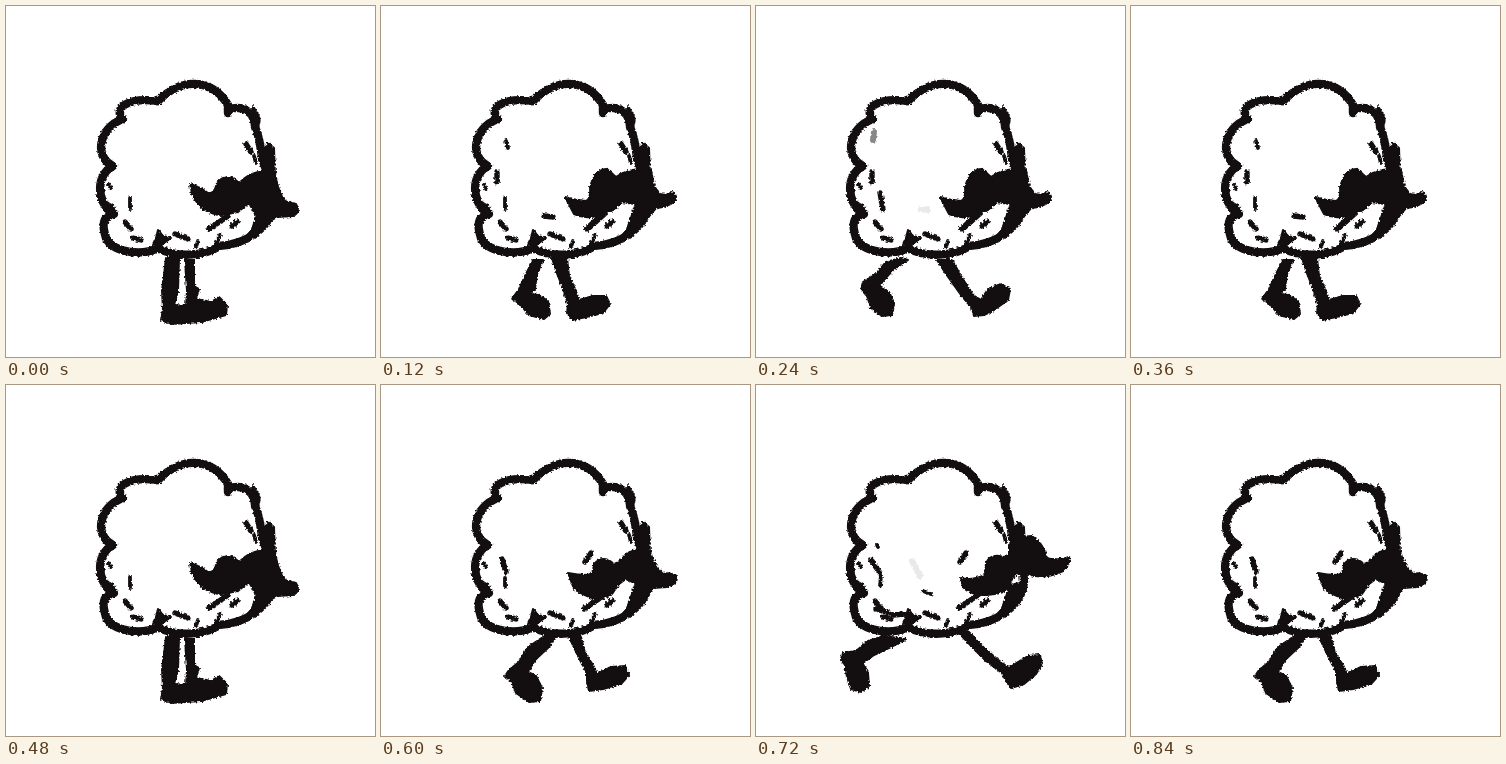
These frames come from a looping animation (369 by 351 pixels, 0.96 s). An HTML page without scripts:

```html
<!DOCTYPE html>
<html lang="en">
<head>
<meta charset="utf-8">
<title>Walking puff</title>
<style>
  html, body { margin: 0; width: 100%; height: 100%; overflow: hidden; background: #fff; }
  svg { display: block; width: 100%; height: 100%; }
  .ink { fill: #130e10; stroke: #130e10; stroke-width: 2; stroke-linejoin: round; stroke-linecap: round; }
  .line { fill: none; stroke-width: 8.4; }
  .thin { fill: none; stroke-width: 3.8; }
  .mark { fill: none; stroke-width: 5.4; }
  .soft { fill: none; stroke-width: 6; stroke: #888; }
  .faint { fill: none; stroke-width: 6; stroke: #e9e9e9; }
  /* eight poses, 120 ms each */
  .step { visibility: hidden; animation: show 960ms step-end infinite; animation-delay: calc(var(--i) * 120ms - 960ms); }
  @keyframes show {
    0% { visibility: visible; }
    12.5%, 100% { visibility: hidden; }
  }
</style>
</head>
<body>
<svg viewBox="0 0 369 351">
  <defs>
    <filter id="crayon" filterUnits="userSpaceOnUse" x="0" y="0" width="369" height="351" color-interpolation-filters="sRGB">
      <feTurbulence type="fractalNoise" baseFrequency=".5" numOctaves="2" seed="4" result="grain"/>
      <feDisplacementMap in="SourceGraphic" in2="grain" scale="3.6" xChannelSelector="R" yChannelSelector="G"/>
      <feGaussianBlur stdDeviation=".35"/>
    </filter>

    <g id="pass">
      <path d="M160 252L173 252 172 285 168 299 180 300 181 285 179 254 188 254 188 280 193 283 190 293 205 296 213 291 221 299 220 309 195 316 165 318 155 314 157 303 156 285Z"/>
      <path d="M184 178Q194 181 202 187Q208 189 211 177Q221 165 233 177Q244 166 258 165L269 166Q271 183 279 195L290 198Q295 206 287 210L271 211 260 217 249 208 243 197 232 206 216 209Q195 208 186 188Z"/>
      <path class="mark" d="M222 210L203 223"/>
      <path class="thin" d="M102 178l3 4M124 192v11M104 199l4 3"/>
    </g>

    <g id="near">
      <path d="M152 254L162 254 156 268 154 283 149 288 158 289 167 295 169 308 163 313 148 309 139 298 131 293 138 283 145 268Z"/>
      <path d="M171 252L186 252 188 270 195 285 198 294 212 290 225 290 229 298 222 307 205 311 192 314 186 307 187 298 181 280 175 265Z"/>
      <use href="#lowered"/>
      <path class="thin" d="M125 135l2 7M103 179l2 4M124 192v11M104 199l4 3"/>
      <path class="mark" d="M116 166l0 10M163 210l9 1"/>
    </g>

    <g id="wide">
      <path d="M152 254L137 264 127 275 123 281 133 286 138 297 136 309 126 310 115 302 111 290 105 283 107 276 120 268 130 256 145 252Z"/>
      <path d="M181 254L196 254 205 270 217 289 225 294 232 283 245 278 254 283 252 294 238 304 228 309 218 310 216 302 205 289 190 268Z"/>
      <use href="#lowered"/>
      <path class="soft" d="M118 126l-1 8"/>
      <path class="faint" d="M165 203l7 1"/>
      <path class="thin" d="M102 178l3 4M104 199l4 3"/>
      <path class="mark" d="M116 166v10M124 187l3 16"/>
    </g>

    <path id="lowered" d="M184 191Q193 194 205 195Q210 193 209 181Q214 163 226 163L235 171Q245 164 258 163L270 164 273 180 279 188Q288 190 290 186Q297 188 294 195Q287 201 275 202L264 215 258 199 241 196 232 204 214 210Q204 213 193 208Z M203 223L221 206 226 208 207 225Z"/>

    <g id="stride">
      <path d="M165 250L175 250 168 262 154 275 147 287 155 291 161 303 159 316 148 317 135 308 131 297 124 291 128 285 138 277 147 262Z"/>
      <path d="M188 252L200 252 204 268 212 280 216 289 230 282 244 281 248 290 240 299 222 304 208 306 206 297 206 288 199 275Z"/>
      <path d="M187 188Q196 190 207 190Q213 188 213 179Q222 169 233 179Q239 177 245 169L258 163 269 166Q273 181 282 189Q290 187 296 191Q297 199 286 202L272 203 263 213 258 200 245 194 238 199 231 209 217 215Q203 211 193 204Z"/>
      <path class="mark" d="M222 211L203 224M121 174l4 13M210 168l-6 9"/>
      <path class="thin" d="M102 178l3 4M124 193v9M104 199l4 3"/>
    </g>

    <g id="leap">
      <path d="M150 254L135 262 118 270 107 278 112 288 113 301 105 307 95 304 91 292 89 280 85 275 87 268 100 266 112 256 128 251Z"/>
      <path d="M202 247L213 247 225 260 241 274 253 283 262 277 272 271 284 270 286 279 280 289 268 299 255 303 250 296 246 288 230 276 218 264Z"/>
      <path d="M205 193Q215 196 229 190L230 178Q235 168 247 172L253 171 253 160Q263 151 276 151Q288 159 291 173Q303 176 313 172Q315 179 307 186Q293 193 278 191L264 186 257 192 252 203Q245 210 226 210Q213 209 207 202Z"/>
      <path class="mark" d="M222 210L203 223M210 168l-6 9M115 175l9 13M120 224l13 4M137 230l12 -1"/>
      <path class="thin" d="M102 178l3 4M121 160l1 2M125 190l-1 11M104 199l4 3M167 206l8 3"/>
      <path class="faint" d="M156 176l8 15"/>
    </g>
  </defs>

  <g class="ink" filter="url(#crayon)">
    <g class="line">
      <path d="M152 95C164 83 177 77 190 78C206 79 216 89 222 99V107"/>
      <path d="M222 104C236 98 249 106 249 121C253 130 255 142 256 152C261 168 268 182 268 197C266 220 241 239 212 240"/>
      <path d="M212 241C198 250 169 252 152 242C136 250 107 247 100 232C97 222 94 211 108 208"/>
      <path d="M106 207C90 194 90 169 107 160C88 151 92 122 117 113C107 103 120 91 152 95"/>
    </g>
    <path d="M247 100L254 112 252 122 247 116ZM262 137L268 142 269 170 258 168 256 150Z"/>
    <path d="M254 200L268 197 265 213 250 230 237 235 246 223Z"/>
    <path d="M152 224L157 230 165 232 158 237 152 242 147 238 150 232Z"/>
    <path class="thin" d="M248 150l2 7M192 235l-2 6M214 229l-4 9"/>
    <path class="mark" d="M240 138l5 8M119 216l6 7M127 232l8 2M169 228l13 5M231 216l-5 4"/>

    <use class="step" style="--i:0" href="#pass"/>
    <use class="step" style="--i:1" href="#near"/>
    <use class="step" style="--i:2" href="#wide"/>
    <use class="step" style="--i:3" href="#near"/>
    <use class="step" style="--i:4" href="#pass"/>
    <use class="step" style="--i:5" href="#stride"/>
    <use class="step" style="--i:6" href="#leap"/>
    <use class="step" style="--i:7" href="#stride"/>
  </g>
</svg>
</body>
</html>
```
